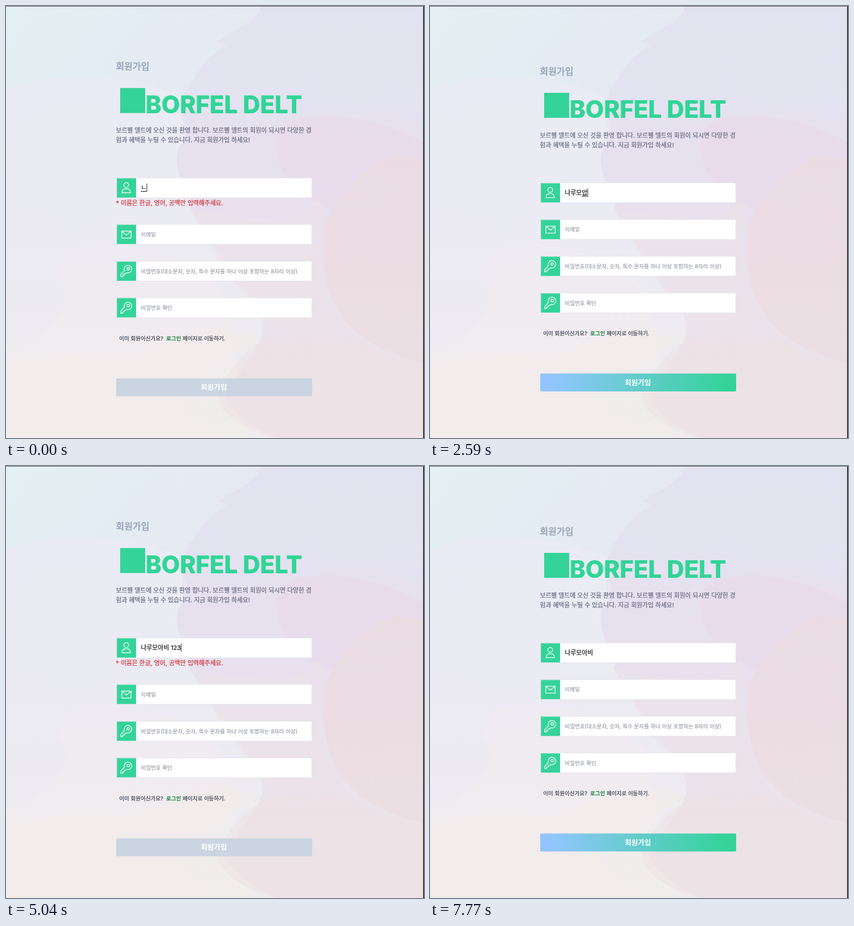
An HTML page for the animation above (8000 ms loop, 736 by 761 pixels).

```html
<!DOCTYPE html>
<html lang="ko">
<head>
<meta charset="utf-8">
<title>회원가입</title>
<style>
  html, body { margin: 0; width: 100%; height: 100%; overflow: hidden; background: #ebe9f2; }
  svg { display: block; }
  text {
    font: 10.8px Inter, "Noto Sans CJK KR", "Noto Sans CJK JP", "Noto Sans CJK", sans-serif;
    white-space: pre;
    fill: currentColor;
    stroke: currentColor;
    stroke-width: .22;
  }
  .title { font-size: 16px; font-weight: 500; color: #94a3b8; stroke-width: .55; }
  .brand { font-size: 42px; font-weight: 800; stroke: none; }
  .intro { color: #64697f; }
  .hint { font-size: 9.5px; color: #9a9dab; }
  .note { font-size: 9.5px; color: #374151; }
  .link { font-weight: 700; color: #15803d; stroke: none; }
  .error { color: #d32f35; }
  .submit { font-size: 12.5px; font-weight: 700; color: #fff; text-anchor: middle; stroke: none; }
  .typed { color: #111; }
  .icon { fill: none; stroke: #e6faf2; stroke-width: 1.4; stroke-linejoin: round; }
  #upper.bad { transform: translateY(-8.6px); }
  #lower.bad { transform: translateY(8.6px); }
  .error, .off { visibility: hidden; }
  .bad .error { visibility: visible; }
  .bad .ready { visibility: hidden; }
</style>
</head>
<body>
<svg width="736" height="761" viewBox="0 0 736 761">
  <defs>
    <linearGradient id="base" x2="0" y2="1">
      <stop offset=".15" stop-color="#e9ebf4"/>
      <stop offset=".55" stop-color="#ecebf3"/>
      <stop offset="1" stop-color="#efebee"/>
    </linearGradient>
    <linearGradient id="sky" x2="1" y2=".3">
      <stop stop-color="#e3f0f4"/><stop offset="1" stop-color="#e5e9f2"/>
    </linearGradient>
    <linearGradient id="lilac" x2="0" y2="1">
      <stop stop-color="#e2e3f0"/><stop offset=".35" stop-color="#e5e2f0"/>
      <stop offset=".6" stop-color="#eae2ed"/><stop offset="1" stop-color="#eee4e7"/>
    </linearGradient>
    <linearGradient id="cream" x2="0" y2="1">
      <stop stop-color="#efebf2"/><stop offset=".5" stop-color="#f1ecef"/>
      <stop offset="1" stop-color="#f1edeb"/>
    </linearGradient>
    <linearGradient id="rose" x2="0" y2="1">
      <stop stop-color="#ebdbe1"/><stop offset="1" stop-color="#ecdee1"/>
    </linearGradient>
    <linearGradient id="cta">
      <stop offset=".05" stop-color="#93c5fd"/><stop offset=".95" stop-color="#34d399"/>
    </linearGradient>
    <g id="field">
      <rect x=".5" y=".5" width="344" height="35" rx="1.5" fill="#fff" stroke="#e5e4ec"/>
      <path d="M1 1H35V35H1Z" fill="#34d399"/>
      <path d="M1.5 35V1.5H35" fill="none" stroke="#74dcb4"/>
    </g>
    <g id="key" class="icon">
      <path d="M14.6 17A6.6 6.6 0 1 1 18.5 20.8L16.5 22.8h-2.5v2.5h-2.5v2.5h-3.5v-3.8Z"/>
      <circle cx="21.2" cy="14" r="2.2"/>
    </g>
  </defs>

  <g id="backdrop">
    <path d="M0 0H736V761H0Z" fill="url(#base)"/>
    <path d="M0 0H460L400 60 310 160Q240 130 150 126Q60 122 0 147Z" fill="url(#sky)"/>
    <path d="M0 606Q60 590 92 548Q118 512 92 478Q88 440 132 426Q180 412 240 428Q320 446 380 500L430 761H0Z" fill="url(#cream)"/>
    <path d="M447 0Q448 14 436 22L404 44L372 62L388 70Q350 92 330 128Q306 160 311 190Q330 222 304 250Q292 280 318 322Q332 352 322 356L352 400Q372 440 420 500Q470 560 440 600L385 690Q420 740 480 761H736V0Z" fill="url(#lilac)"/>
    <path d="M311 160Q350 210 420 214Q520 190 600 186Q680 184 736 214V330Q620 300 560 390L470 380Q400 380 330 360Q290 290 311 240Z" fill="#e9dff0" opacity=".5"/>
    <path d="M476 236Q480 206 520 196Q620 180 736 240V290Q640 262 575 360Q540 350 510 318Q474 290 476 236Z" fill="#e9dbeb" opacity=".6"/>
    <path d="M322 356Q400 372 470 376Q520 380 548 340Q566 360 552 400Q540 480 590 560L520 600Q410 520 360 420Z" fill="#ede3ea" opacity=".6"/>
    <path d="M0 640Q100 600 220 622Q330 560 400 570Q450 576 448 592Q360 620 300 690Q330 740 372 761H0Z" fill="#f2edeb" opacity=".7"/>
    <path d="M448 592Q560 560 640 604Q690 625 736 630V761H470Q380 730 372 690Q390 630 448 592Z" fill="#eee1e4" opacity=".5"/>
    <path d="M736 270Q708 268 684 262Q650 276 620 303Q570 350 558 400Q552 440 566 490Q578 550 640 592Q690 620 736 630Z" fill="url(#rose)" opacity=".85"/>
  </g>

  <g id="upper">
    <text class="title" x="193.5" y="121">회원가입</text>
    <path d="M201 153h44v44h-44Z" fill="#34d399"/>
    <text class="brand" x="245.2" y="196.6" color="#7fe6c0">BORFEL DELT</text>
    <text class="brand" x="246" y="197.4" color="#32d496">BORFEL DELT</text>
    <text class="intro" x="193.5" y="231.5">보르펠 델트에 오신 것을 환영 합니다. 보르펠 델트의 회원이 되시면 다양한 경</text>
    <text class="intro" x="193.5" y="248.7">험과 혜택을 누릴 수 있습니다. 지금 회원가입 하세요!</text>
    <g transform="translate(194 311)">
      <use href="#field"/>
      <g class="icon">
        <circle cx="17.7" cy="13" r="4.2"/>
        <path d="M10.3 26.6Q10.3 19.4 17.7 19.4T25.1 26.6Z"/>
      </g>
    </g>
    <text class="typed" id="name" x="237.5" y="332.7"></text>
    <rect id="compose" y="334.6" height="1" fill="#111"/>
    <rect id="caret" y="321.4" width="1" height="14.4" fill="#222"/>
    <text class="error" x="193.5" y="359.6">* 이름은 한글, 영어, 공백만 입력해주세요.</text>
  </g>

  <g id="lower">
    <g transform="translate(194 375.7)">
      <use href="#field"/>
      <path class="icon" d="M9.7 12.2H26.3V24.4H9.7ZL18 19.2L26.3 12.2"/>
      <text class="hint" x="43.5" y="21.8">이메일</text>
      <rect id="mailCaret" x="43.5" y="10.6" width="1" height="14.4" fill="#222"/>
    </g>
    <g transform="translate(194 440.4)">
      <use href="#field"/><use href="#key"/>
      <text class="hint" x="43.5" y="21.8">비밀번호(대소문자, 숫자, 특수 문자를 하나 이상 포함하는 8자리 이상)</text>
    </g>
    <g transform="translate(194 505)">
      <use href="#field"/><use href="#key"/>
      <text class="hint" x="43.5" y="21.8">비밀번호 확인</text>
    </g>
    <text class="note" x="199.3" y="580.2">이미 회원이신가요?</text>
    <text class="note link" x="282" y="580.2">로그인</text>
    <text class="note" x="311" y="580.2">페이지로 이동하기.</text>
    <rect x="194" y="647.4" width="345" height="31.6" rx="2" fill="#cbd5e1"/>
    <rect class="ready" x="194" y="647.4" width="345" height="31.6" rx="2" fill="url(#cta)"/>
    <text class="submit" x="366" y="667.8">회원가입</text>
  </g>

  <path d="M0 0H736V1H0Z" fill="#666"/>
  <path d="M734.6 1H736V761H734.6Z" fill="#111"/>
</svg>
<script>
  const LOOP = 8000;
  const LEFT = 237.5;
  const USER = "나루모아비";
  // Flags: u = syllable being composed, c = caret, e = error, m = caret in the email field
  const steps = [
    [0, "ㄴ", "uce"], [350, "ㄴ", "ue"], [910, "ㄴ", "uce"],
    [1260, "나", "uc"], [1820, "나루", "uc"], [1890, "나루모", "uc"],
    [2380, "나루몽", "uc"], [2450, "나루모아", "uc"], [2590, "나루모압", "uc"],
    [2730, USER, "uc"], [3290, USER, "u"],
    [3500, USER + " ", "c"], [4060, USER + " ", ""],
    [4410, USER + " 1", "ce"], [4690, USER + " 12", "ce"], [5040, USER + " 123", "ce"],
    [5530, USER + " 123", "e"], [5740, USER + " 12", "e"], [5950, USER + " 1", "e"],
    [6090, USER + " 1", "ce"],
    [6230, USER + " ", "c"], [6580, USER + " ", ""],
    [7140, USER + " ", "m"], [7770, USER + " ", ""]
  ];

  const $ = id => document.getElementById(id);
  const show = (id, on) => $(id).classList.toggle("off", !on);
  const start = performance.now();
  let current;

  function render([, text, flags]) {
    const has = flag => flags.includes(flag);
    const name = $("name");
    name.textContent = text;
    const end = LEFT + name.getComputedTextLength();
    const from = LEFT + (text.length > 1 ? name.getSubStringLength(0, text.length - 1) : 0);
    $("caret").setAttribute("x", end);
    $("compose").setAttribute("x", from);
    $("compose").setAttribute("width", end - from);
    show("compose", has("u"));
    show("caret", has("c"));
    show("mailCaret", has("m"));
    for (const id of ["upper", "lower"]) $(id).classList.toggle("bad", has("e"));
  }

  function tick() {
    const t = (performance.now() - start) % LOOP;
    const step = steps.findLast(([at]) => at <= t);
    if (step !== current) render(current = step);
    requestAnimationFrame(tick);
  }
  tick();
</script>
</body>
</html>
```
